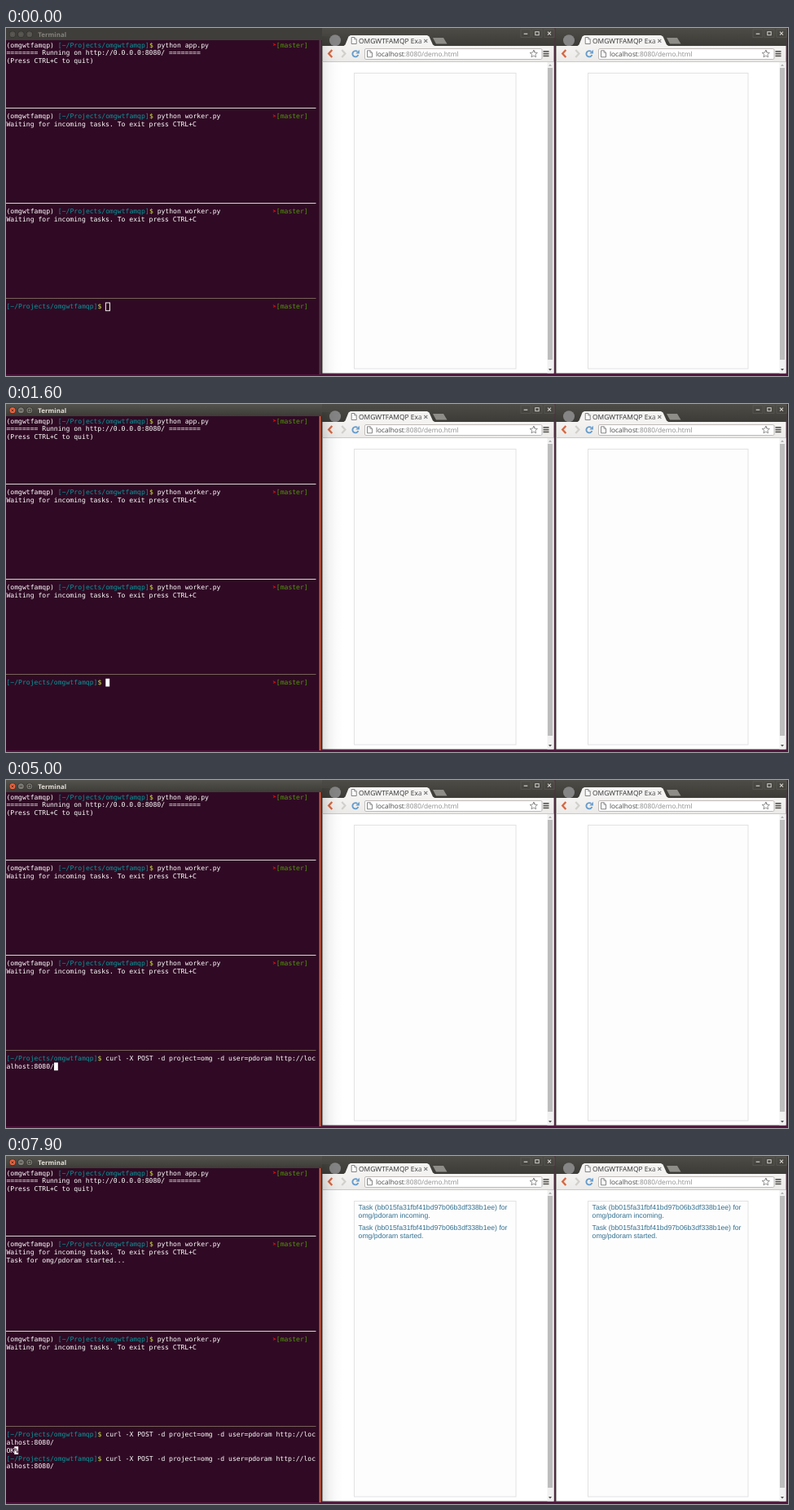
An HTML page with a canvas for the animation above (8000 ms loop, 960 by 428 pixels).

```html
<!DOCTYPE html>
<html lang="en">
<head>
<meta charset="utf-8">
<title>Task queue demo</title>
<style>
html, body { margin: 0; width: 100%; height: 100%; overflow: hidden; background: #3a1030; }
canvas { display: block; }
</style>
</head>
<body>
<canvas id="stage" width="960" height="428"></canvas>
<script>
const ctx = document.getElementById('stage').getContext('2d');
ctx.textRendering = 'geometricPrecision';

const LOOP = 8000;
const FOCUS = 1100, RECALL = 4500, ENTER = 5400, OUTPUT = 5600, PROMPT = 6000, RECALL_2 = 7000;
const KEYS = [2800, 2900, 3000, 3200];
const EVENTS = [FOCUS, ...KEYS, RECALL, ENTER, RECALL_2];

const CELL_W = 4.872, CELL_H = 9.75, COLS = 78;
const MONO = '8.09px "DejaVu Sans Mono", monospace';
const UI = '"Open Sans", sans-serif';
const PAGE = '8.66px "Liberation Sans", Arial, sans-serif';

const USER = 'pdoram';
const COMMAND = `curl -X POST -d project=omg -d user=${USER} http://localhost:8080/`;
const TASK = 'Task (bb015fa31fbf41bd97b06b3df338b1ee) for';
const PATH = '[~/Projects/omgwtfamqp]';
const VENV = '(omgwtfamqp) ';
const INK = { bg: '#300a24', text: '#ffffff', path: '#06989a', sign: '#cde83c', branch: '#4e9a06', arrow: '#cc1010' };

function rect(x, y, w, h, color) {
  ctx.fillStyle = color;
  ctx.fillRect(x, y, w, h);
}

function outline(x, y, w, h, color, width = 1) {
  ctx.strokeStyle = color;
  ctx.lineWidth = width;
  ctx.strokeRect(x, y, w, h);
}

function tracePoints(points) {
  ctx.beginPath();
  points.forEach(([x, y], i) => i ? ctx.lineTo(x, y) : ctx.moveTo(x, y));
}

function shape(points, color) {
  tracePoints(points);
  ctx.closePath();
  ctx.fillStyle = color;
  ctx.fill();
}

function line(points, color, width = 1) {
  tracePoints(points);
  ctx.strokeStyle = color;
  ctx.lineWidth = width;
  ctx.stroke();
}

function disc(x, y, r, color) {
  ctx.beginPath();
  ctx.arc(x, y, r, 0, Math.PI * 2);
  ctx.fillStyle = color;
  ctx.fill();
}

function cross(x, y, r, color, width) {
  line([[x - r, y - r], [x + r, y + r]], color, width);
  line([[x + r, y - r], [x - r, y + r]], color, width);
}

function text(str, x, y, font, color) {
  ctx.font = font;
  ctx.fillStyle = color;
  ctx.fillText(str, x, y);
  return x + ctx.measureText(str).width;
}

function gradient(x0, y0, x1, y1, ...colors) {
  const g = ctx.createLinearGradient(x0, y0, x1, y1);
  colors.forEach((color, i) => g.addColorStop(i / (colors.length - 1), color));
  return g;
}

// Terminal grid
const colX = col => 0.5 + col * CELL_W;
const rowY = row => 16 + row * CELL_H;

function put(str, col, row, color = INK.text) {
  text(str, colX(col), rowY(row) + 7.7, MONO, color);
}

function wrapped(str, col, row) {
  put(str.slice(0, COLS - col), col, row);
  put(str.slice(COLS - col), 0, row + 1);
}

function branch(row) {
  const x = colX(67), y = rowY(row) + 4.4;
  shape([[x + 0.6, y - 2.2], [x + 4.8, y], [x + 0.6, y + 1.8], [x + 1.8, y]], INK.arrow);
  put('[master]', 68, row, INK.branch);
}

function prompt(row, venv = '') {
  put(venv, 0, row);
  put(PATH, venv.length, row, INK.path);
  put('$', venv.length + PATH.length, row, INK.sign);
  return venv.length + PATH.length + 2;
}

function runningPane(row, command, lines) {
  put(command, prompt(row, VENV), row);
  branch(row);
  lines.forEach((str, i) => put(str, 0, row + 1 + i));
}

function cursor(col, row, t) {
  const x = colX(col), y = rowY(row);
  if (t < FOCUS) {
    outline(x + 0.1, y + 0.2, CELL_W + 0.2, CELL_H, '#f4f0f2', 1);
    return;
  }
  const last = EVENTS.filter(e => e <= t).pop();
  if ((t - last) % 1200 < 600) rect(x, y, CELL_W, CELL_H, '#ffffff');
}

function shell(t) {
  const start = prompt(33);
  if (t < RECALL) {
    const typed = KEYS.filter(k => k <= t).length;
    put(COMMAND.slice(0, typed), start, 33);
    branch(33);
    cursor(start + typed, 33, t);
    return;
  }
  const endCol = start + COMMAND.length - COLS;
  wrapped(COMMAND, start, 33);
  if (t < ENTER) return cursor(endCol, 34, t);
  if (t < OUTPUT) return cursor(0, 35, t);

  put('OK', 0, 35);
  rect(colX(2), rowY(35), CELL_W, CELL_H, '#ffffff');
  text('%', colX(2), rowY(35) + 7.7, 'bold ' + MONO, INK.bg);
  if (t < PROMPT) return cursor(0, 36, t);

  prompt(36);
  if (t < RECALL_2) {
    branch(36);
    cursor(start, 36, t);
  } else {
    wrapped(COMMAND, start, 36);
    cursor(endCol, 37, t);
  }
}

function terminal(t) {
  const focused = t >= FOCUS;
  rect(0, 0, 388, 15, focused ? gradient(0, 0, 0, 15, '#55534d', '#3c3b37') : '#3f3e3a');
  for (let i = 0; i < 3; i++) {
    const x = 8 + i * 10.4, hot = focused && i === 0;
    const glyph = hot ? '#5a2010' : focused ? '#36352f' : '#5f5d57';
    disc(x, 7.8, 4, '#2d2c29');
    disc(x, 7.8, 3.5, hot ? '#ee6540' : focused ? '#7d7b74' : '#56544e');
    if (i === 0) cross(x, 7.8, 1.4, glyph, 0.9);
    if (i === 1) line([[x - 1.7, 7.8], [x + 1.7, 7.8]], glyph, 0.9);
    if (i === 2) outline(x - 1.5, 6.3, 3, 3, glyph, 0.8);
  }
  text('Terminal', 39.3, 10.9, `bold 7.9px ${UI}`, focused ? '#e4e0d8' : '#85827b');

  rect(0, 15, 385, 411, INK.bg);
  rect(384.6, 15, 2, 411, focused ? '#e2663c' : '#57404d');
  rect(386.6, 15, 1.4, 411, '#3c2833');

  [8, 20, 32].forEach(row => {
    rect(0, rowY(row) + 4, 380.5, 1, row === 32 ? '#756257' : '#dcd6da');
  });

  const waiting = 'Waiting for incoming tasks. To exit press CTRL+C';
  const first = t >= OUTPUT ? [waiting, `Task for omg/${USER} started...`] : [waiting];
  runningPane(0, 'python app.py', ['======== Running on http://0.0.0.0:8080/ ========', '(Press CTRL+C to quit)']);
  runningPane(9, 'python worker.py', first);
  runningPane(21, 'python worker.py', [waiting]);
  shell(t);
}

// Browser
function pageIcon(x, y) {
  tracePoints([[x, y], [x + 3.6, y], [x + 6, y + 2.4], [x + 6, y + 8], [x, y + 8]]);
  ctx.closePath();
  ctx.fillStyle = '#ffffff';
  ctx.fill();
  ctx.strokeStyle = '#777';
  ctx.lineWidth = 0.9;
  ctx.stroke();
  line([[x + 3.5, y], [x + 3.5, y + 2.5], [x + 6, y + 2.5]], '#777', 0.7);
}

function star(x, y) {
  const points = Array.from({ length: 10 }, (_, i) => {
    const a = -Math.PI / 2 + i * Math.PI / 5, r = i % 2 ? 2.2 : 4.8;
    return [x + r * Math.cos(a), y + r * Math.sin(a)];
  });
  line([...points, points[0], points[1]], '#777', 0.8);
}

function reload(x, y) {
  ctx.strokeStyle = '#669ccb';
  ctx.lineWidth = 1.9;
  ctx.beginPath();
  ctx.arc(x, y, 3.6, 0.35, Math.PI * 1.72);
  ctx.stroke();
  shape([[x + 4.9, y - 5], [x + 4.9, y - 0.3], [x + 0.4, y - 0.3]], '#669ccb');
}

function windowButtons(right) {
  const light = '#d6d3cd';
  [35, 21, 6].forEach((d, i) => {
    const x = right - d;
    outline(x - 6, 1.8, 12, 9.5, '#5b5a54', 0.8);
    if (i === 0) line([[x - 2.3, 7.2], [x + 2.3, 7.2]], light, 1.2);
    if (i === 1) outline(x - 2.2, 4.7, 4.4, 4, light, 1);
    if (i === 2) cross(x, 6.7, 2, light, 1.1);
  });
}

function tabStrip(x, right) {
  rect(x - 0.5, 0, right - x + 1, 22.5, gradient(0, 0, 0, 22, '#4d4c46', '#3c3b37'));
  windowButtons(right);
  disc(x + 16, 15.3, 7, '#858585');
  shape([[x + 26, 22.5], [x + 28.5, 20.5], [x + 32.5, 10.5], [x + 35, 9],
    [x + 129, 9], [x + 131.5, 10.5], [x + 136, 20.5], [x + 139, 22.5]], '#f4f3f2');
  shape([[x + 136, 12], [x + 149, 12], [x + 153.5, 19.5], [x + 140, 19.5]], '#8f8d88');
  pageIcon(x + 36.2, 11.5);
  const fade = gradient(x + 116, 0, x + 126, 0, '#333333', '#8a8a8a');
  text('OMGWTFAMQP Exa', x + 45, 18.7, `8.45px ${UI}`, fade);
  cross(x + 127.3, 15.8, 2, '#777', 1.1);
}

function toolbar(x, right) {
  rect(x + 0.5, 22, right - x - 1, 20, gradient(0, 22, 0, 42, '#f4f3f2', '#eceae8'));
  rect(x + 0.5, 41.2, right - x - 1, 0.8, '#c4c1be');
  line([[x + 12.3, 27], [x + 8.2, 31.5], [x + 12.3, 36]], '#d9653f', 2.3);
  line([[x + 24.3, 27], [x + 28.4, 31.5], [x + 24.3, 36]], '#d2d0cd', 2.3);
  reload(x + 41, 31.8);
  ctx.beginPath();
  ctx.roundRect(x + 52.5, 25.5, right - x - 67.5, 13, 1.5);
  ctx.fillStyle = '#ffffff';
  ctx.fill();
  ctx.strokeStyle = '#b7b4b1';
  ctx.lineWidth = 0.9;
  ctx.stroke();
  pageIcon(x + 55.5, 27.8);
  const hostEnd = text('localhost', x + 66, 34.5, `8.3px ${UI}`, '#454545');
  text(':8080/demo.html', hostEnd, 34.5, `8.3px ${UI}`, '#8a8a8a');
  star(right - 25.2, 31.9);
  for (let i = 0; i < 3; i++) rect(right - 13.5, 28 + i * 2.8, 7, 1.6, '#55534f');
}

function page(x, right, t) {
  rect(x + 0.5, 42, right - x - 1, 382.5, '#ffffff');
  rect(right - 8.5, 42, 8, 382.5, '#f1f1f1');
  rect(right - 8, 49, 6, 359, '#bdbdbd');
  shape([[right - 7, 46.8], [right - 3, 46.8], [right - 5, 44.4]], '#a5a5a5');
  shape([[right - 7, 419], [right - 3, 419], [right - 5, 421.6]], '#505050');

  const boxWidth = right - x - 86.5;
  rect(x + 39.5, 55.5, boxWidth, 363.5, '#fdfdfe');
  outline(x + 39.5, 55.5, boxWidth, 363.5, '#e2e2e4', 1);
  if (t < OUTPUT) return;
  ['incoming', 'started'].forEach((state, i) => {
    const y = 66 + i * 25;
    text(TASK, x + 44.6, y, PAGE, '#31708f');
    text(`omg/${USER} ${state}.`, x + 44.6, y + 10.4, PAGE, '#31708f');
  });
}

function browser(x, right, t) {
  rect(x - 0.5, 0, right - x + 1, 425.5, '#4a4944');
  tabStrip(x, right);
  toolbar(x, right);
  page(x, right, t);
}

// Soft shadow the terminal casts on the window beside it
function terminalShadow(focused) {
  const shade = a => `rgba(0, 0, 0, ${focused ? a : a * 0.6})`;
  rect(388, 10, 26, 416, gradient(388, 0, 414, 0, shade(0.13), shade(0.05), shade(0.015), shade(0)));
}

function draw(now) {
  const t = now % LOOP;
  rect(0, 0, 960, 428, '#56103f');
  browser(388, 673, t);
  browser(675, 958, t);
  terminalShadow(t >= FOCUS);
  terminal(t);
  requestAnimationFrame(() => draw(performance.now() - began));
}

const began = performance.now();
draw(0);
</script>
</body>
</html>
```
